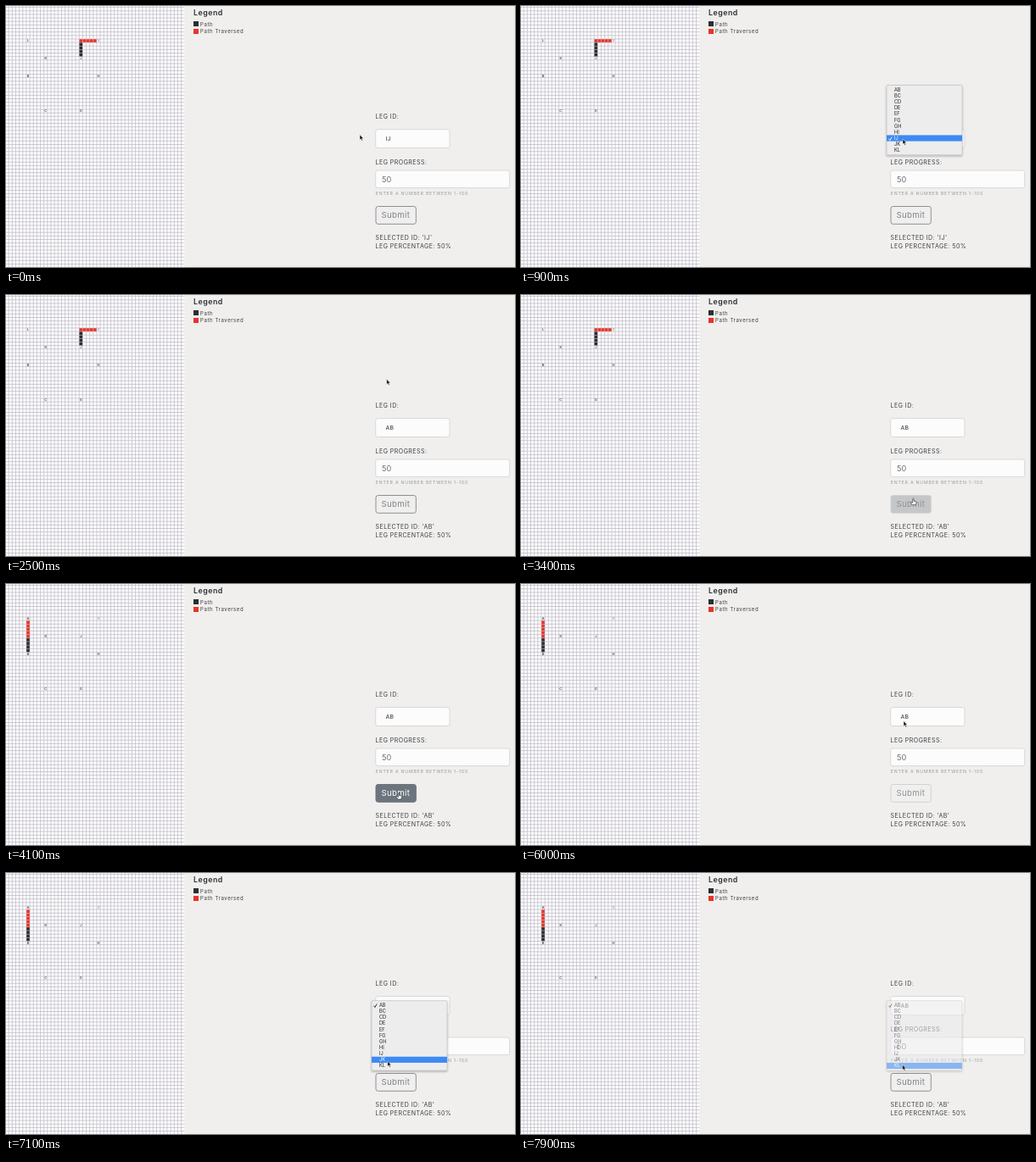
Animation of 600 by 308 pixels, one loop 8000 ms. Source, as an HTML page:

```html
<!DOCTYPE html>
<html lang="en">
<head>
<meta charset="utf-8">
<title>Leg progress map</title>
<style>
  html, body { margin: 0; width: 100%; height: 100%; overflow: hidden; background: #f0efed; }
  svg { display: block; width: 100vw; height: 100vh; }
  text { font-family: Inter, "Open Sans", sans-serif; fill: #3a3d42; white-space: pre; }
  .label { font-size: 7px; letter-spacing: .48px; }
  .hint { font-size: 5.2px; letter-spacing: .8px; fill: #95999e; }
  .legend { font-size: 6px; letter-spacing: .6px; }
  .title { font-size: 8.8px; font-weight: 600; letter-spacing: .5px; fill: #2b2f35; }
  .value { font-size: 6.8px; letter-spacing: .3px; fill: #2b2b2e; }
  .number { font-size: 9.2px; fill: #6a6f76; }
  .submit { font-size: 9.6px; letter-spacing: .35px; }
  .node { font-size: 3.9px; font-weight: 500; text-anchor: middle; fill: #2e2e33; }
  .item { font-size: 5.6px; fill: #1d1d1f; }
  .field { fill: #fdfcfd; stroke: #d3d5da; stroke-width: .9; }
</style>
</head>
<body>
<svg id="stage" viewBox="0 0 600 308" preserveAspectRatio="none">
  <defs>
    <filter id="shadow" x="-10%" y="-10%" width="120%" height="125%">
      <feDropShadow dx="0" dy="1.2" stdDeviation="1.3" flood-opacity=".32"/>
    </filter>
  </defs>
  <rect width="600" height="308" fill="#f0efed"/>
  <rect width="210.4" height="308" fill="#fff"/>
  <path id="grid" fill="none" stroke="#c0bdc8" stroke-width=".8"/>
  <g id="nodes"></g>
  <g id="routes"></g>

  <text class="title" x="221" y="10.7">Legend</text>
  <rect x="221" y="18" width="6" height="6" fill="#2b2e31"/>
  <rect x="221" y="27" width="6" height="6" fill="#e8342a"/>
  <text class="legend" x="229" y="23.6">Path</text>
  <text class="legend" x="229" y="32.4">Path Traversed</text>

  <text class="label" x="435.6" y="132.8">LEG ID:</text>
  <rect class="field" x="435.7" y="145.7" width="87.3" height="21.8" rx="2.5"/>
  <text class="value" id="choice" x="447.5" y="158.9"></text>
  <text class="label" x="435.6" y="186.8">LEG PROGRESS:</text>
  <rect class="field" x="435.7" y="194" width="158" height="20.6" rx="2.5"/>
  <text class="number" x="443" y="207.5">50</text>
  <text class="hint" x="435.8" y="222.5">ENTER A NUMBER BETWEEN 1-100</text>
  <rect id="ring" x="434.5" y="235" width="50.3" height="23.8" rx="4" fill="none" stroke="#6c757d" stroke-opacity=".4" stroke-width="2.4"/>
  <rect id="button" x="436" y="236.5" width="47.3" height="20.8" rx="2.5"/>
  <text class="submit" id="submit" x="442.5" y="250.2">Submit</text>
  <text class="label" id="selected" x="435.6" y="276.2"></text>
  <text class="label" x="435.6" y="286.3">LEG PERCENTAGE: 50%</text>

  <g id="menu">
    <rect x="431" width="89" height="82.3" rx="1" fill="#eeedee" stroke="#b9b9bb" stroke-width=".6" filter="url(#shadow)"/>
    <rect id="bar" x="431" width="89" height="7.15" fill="#3c8af5"/>
    <g id="items"></g>
    <path id="check" d="M433.6 0l1.3 1.8l2.3-4" fill="none" stroke="#1d1d1f" stroke-width=".9"/>
  </g>
  <path id="arrow" d="M0 0V6.2L1.4 5L2.4 7.3L3.5 6.8L2.5 4.6H4.4Z" fill="#111" stroke="#fff" stroke-width=".5"/>
  <path id="hand" d="M-.6-3.2Q0-4 .6-3.2V-.6L3.2 0Q3.8.4 3.6 1.6L2.8 4H-1.2L-3 1.2Q-3 .2-2 .6L-.6 1.6Z" fill="#fff" stroke="#222" stroke-width=".6"/>
</svg>
<script>
const LOOP = 8000, STEP = 100;
const CELL = 4.15, LEFT = 23.95, TOP = 38.95;
const ROW = 7.15, PAD = 1.7;
const LEGS = ["AB", "BC", "CD", "DE", "EF", "FG", "GH", "HI", "IJ", "JK", "KL"];
const $ = id => document.getElementById(id);

function add(parent, tag, attrs, text = "") {
  const el = document.createElementNS("http://www.w3.org/2000/svg", tag);
  set(el, attrs);
  el.textContent = text;
  parent.appendChild(el);
  return el;
}
function set(el, attrs) {
  for (const key in attrs) el.setAttribute(key, attrs[key]);
}
const show = (el, on) => el.setAttribute("visibility", on ? "visible" : "hidden");
const clamp = (v, lo, hi) => Math.min(hi, Math.max(lo, v));
const ramp = (t, from, length) => clamp((t - from) / length, 0, 1);

// Grid lines, node letters and the two routes; columns and rows count from node A.
let lines = "";
for (let x = LEFT - 5 * CELL; x < 210.5; x += CELL) lines += `M${x} 0V308`;
for (let y = TOP - 9 * CELL; y < 308; y += CELL) lines += `M0 ${y}H210.4`;
$("grid").setAttribute("d", lines);

function node(name, col, row) {
  return add($("nodes"), "text", {
    class: "node", x: LEFT + (col + .5) * CELL, y: TOP + (row + .5) * CELL + 1.4
  }, name);
}
const nodeL = node("L", 0, 0), nodeA = node("A", 0, 0);
node("I", 20, 0); node("K", 5, 5); node("J", 15, 5);
node("B", 0, 10); node("H", 20, 10); node("C", 5, 20); node("G", 15, 20);

function route(cells) {
  const group = add($("routes"), "g", {});
  cells.forEach(([col, row], i) => add(group, "rect", {
    x: LEFT + col * CELL + .25, y: TOP + row * CELL + .25,
    width: CELL - .5, height: CELL - .5, fill: i < 5 ? "#e8342a" : "#2b2e31"
  }));
  return group;
}
const nine = [...Array(9).keys()];
const routeIJ = route(nine.map(i => i < 5 ? [19 - i, 0] : [15, i - 4]));
const routeAB = route(nine.map(i => [0, i + 1]));

const items = LEGS.map((leg, i) =>
  add($("items"), "text", { class: "item", x: 440, y: PAD + (i + .5) * ROW + 2 }, leg));

// Pointer stops: time, x, y
const stops = [
  [0, 417, 151.8], [600, 449, 157], [900, 450, 157], [1400, 449.6, 103.6],
  [1700, 448.7, 99.3], [2700, 448.7, 99.3], [3500, 463, 247], [5100, 463, 247],
  [5900, 451, 161.6], [6500, 451, 161.6], [7100, 449.8, 222], [7200, 449.6, 226.2],
  [8000, 449.6, 226.2]
];
function pointer(t) {
  const i = Math.max(1, stops.findIndex(s => s[0] >= t));
  const [t0, x0, y0] = stops[i - 1], [t1, x1, y1] = stops[i];
  const p = ramp(t, t0, t1 - t0), e = p * p * (3 - 2 * p);
  return [x0 + (x1 - x0) * e, y0 + (y1 - y0) * e];
}

function mix(a, b, p) {
  return `rgb(${a.map((v, i) => Math.round(v + (b[i] - v) * p))})`;
}

function drawMenu(t, y) {
  const second = t > 4000;
  const [open, click, fade] = second ? [6500, 7500, 7750] : [800, 1900, 2100];
  const top = second ? 150.7 : 93.5;
  const current = second ? 0 : 8;
  const alpha = t < open ? 0 : 1 - ramp(t, fade, 340);
  show($("menu"), alpha > 0);
  set($("menu"), { transform: `translate(0 ${top})`, opacity: alpha });
  const row = clamp(Math.floor((y - top - PAD) / ROW), 0, 10);
  const lit = t !== click;
  set($("bar"), { y: PAD + row * ROW, opacity: lit ? 1 : 0 });
  items.forEach((el, i) => { el.style.fill = lit && i === row ? "#fff" : "#1d1d1f"; });
  set($("check"), {
    transform: `translate(0 ${PAD + (current + .5) * ROW + .7})`,
    stroke: lit && current === row ? "#fff" : "#1d1d1f"
  });
}

function drawButton(t) {
  const hover = ramp(t, 3350, 150) * (1 - ramp(t, 5350, 200));
  const pale = t > 3350 ? 1 - ramp(t, 6450, 150) : 0;
  const dark = [108, 117, 125];
  set($("button"), {
    fill: mix([240, 239, 237], dark, hover),
    stroke: hover > .5 ? "#6c757d" : mix([139, 145, 153], [208, 209, 211], pale),
    "stroke-width": 1
  });
  const ink = mix([125, 131, 138], [141, 146, 151], pale);
  $("submit").style.fill = hover > .5 ? "#fff" : ink;
  show($("ring"), t >= 3700 && t < 4100);
}

function draw(time) {
  const t = Math.floor((time % LOOP) / STEP) * STEP;
  const [x, y] = pointer(t);
  const moved = t >= 3900;
  const leg = t >= 2100 ? "AB" : "IJ";
  show(routeIJ, !moved);
  show(nodeL, !moved);
  show(routeAB, moved);
  show(nodeA, moved);
  $("choice").textContent = leg;
  $("selected").textContent = `SELECTED ID: '${leg}'`;
  drawButton(t);
  drawMenu(t, y);
  const over = y > 236.5;
  show($("hand"), over);
  show($("arrow"), !over);
  set($("hand"), { transform: `translate(${x} ${y + 3})` });
  set($("arrow"), { transform: `translate(${x} ${y})` });
}

const start = performance.now();
function tick() {
  draw(performance.now() - start);
  requestAnimationFrame(tick);
}
tick();
</script>
</body>
</html>
```
